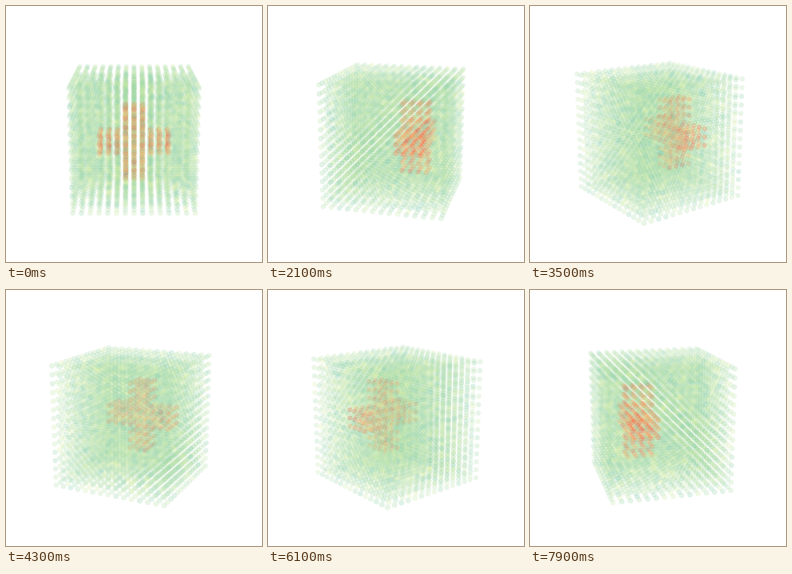
Write a matplotlib script that moves like this. It is 256 by 256 pixels and loops after 8 s.

```python
import numpy as np
import matplotlib.pyplot as plt
from matplotlib.animation import FuncAnimation

SIZE, DPI = 256, 100
FRAMES, INTERVAL = 80, 100
STEP = np.radians(3.6)        # turn per frame
ELEV = np.radians(16)
DIST, FOCAL = 5.4, 621        # camera distance in cube sides, focal length in px
CX, CY = 128, 129.2
N, HEIGHT = 15, 1.035
RADIUS = 2.55                 # marker radius in px at the cube's centre

# Lattice of voxels: u across, v towards the viewer, w up
cells = np.arange(N) - N // 2
u, v, w = (g.ravel() for g in np.meshgrid(cells, cells, cells, indexing="ij"))

# A plus-shaped active block, four layers thick, in a noisy volume
plus = ((abs(u) <= 4) & (abs(w) <= 1)) | ((abs(u) <= 1) & (abs(w) <= 4))
active = plus & (v >= 1) & (v <= 4)
rng = np.random.default_rng(7)
value = np.where(active, 0.765, 0.3) + rng.normal(0, 0.035, u.size)
colors = plt.get_cmap("Spectral_r")(np.clip(value, 0, 1))
opacity = np.where(active, 1.6, 1.0)

u, v, w = u / (N - 1), v / (N - 1), w / (N - 1) * HEIGHT


def project(angle):
    """Pixel position and depth of every voxel for a turn of the cube."""
    x = u * np.cos(angle) + v * np.sin(angle)
    near = v * np.cos(angle) - u * np.sin(angle)
    y = w * np.cos(ELEV) - near * np.sin(ELEV)
    depth = DIST - near * np.cos(ELEV) - w * np.sin(ELEV)
    return CX + FOCAL * x / depth, CY - FOCAL * y / depth, depth


fig = plt.figure(figsize=(SIZE / DPI, SIZE / DPI), dpi=DPI, facecolor="white")
ax = fig.add_axes([0, 0, 1, 1])
ax.set_xlim(0, SIZE)
ax.set_ylim(SIZE, 0)
ax.axis("off")
dots = ax.scatter(u, v, s=1, c=colors, linewidths=0)


def update(frame):
    x, y, depth = project(frame * STEP)
    order = np.argsort(-depth)
    depth = depth[order]
    rgba = colors[order]
    shade = np.interp(depth, [DIST - 0.8, DIST + 0.8], [0.27, 0.21])
    rgba[:, 3] = shade * opacity[order]
    radius = RADIUS * DIST / depth
    dots.set_offsets(np.column_stack([x[order], y[order]]))
    dots.set_sizes((2 * radius * 72 / DPI) ** 2)
    dots.set_facecolors(rgba)
    return (dots,)


anim = FuncAnimation(fig, update, frames=FRAMES, interval=INTERVAL,
                     repeat=True, repeat_delay=0, blit=False)
plt.show()
```
